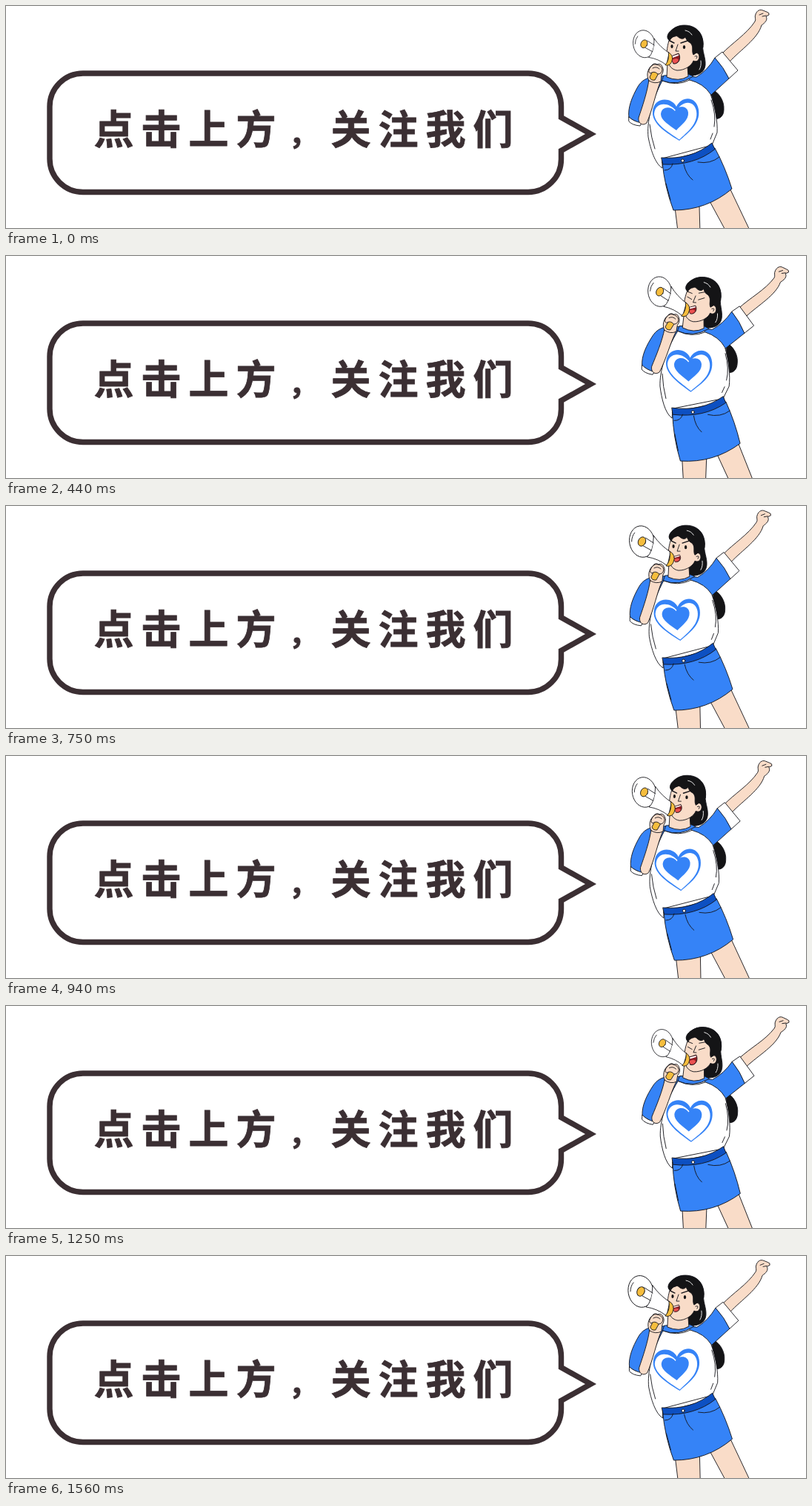
Write an HTML page that moves like this. It is 1080 by 300 pixels and loops after 1.62 s.

```html
<!DOCTYPE html>
<html lang="zh-CN">
<head>
<meta charset="utf-8">
<title>点击上方，关注我们</title>
<style>
  html, body { margin: 0; width: 100%; height: 100%; overflow: hidden; background: #fff; }
  svg { display: block; width: 1080px; height: 300px; }
  .bubble { fill: none; stroke: #3b2f33; stroke-width: 7.4; }
  .label { font: 900 54px "Noto Sans CJK SC", "Noto Sans CJK", sans-serif; letter-spacing: 10px; fill: #3b2f33; stroke: #3b2f33; stroke-width: .8; }
  .comma { font-size: 40px; letter-spacing: 17px; }
  #girl { stroke: #15151a; stroke-width: .9; stroke-linejoin: round; stroke-linecap: round; }
  .skin { fill: #f9dcc8; }
  .blue { fill: #3583f7; }
  .navy { fill: #0d50c2; }
  .white { fill: #fff; }
  .gold { fill: #f6bd3d; }
  .hair { fill: #141416; }
  .line { fill: none; }
  .bare { stroke: none; }
</style>
</head>
<body>
<svg viewBox="0 0 1080 300">
  <path class="bubble" d="M104 91H705A44.500 44.500 0 0 1 749.500 135.500V150.500L789.500 173L749.500 195.500V207A44.500 44.500 0 0 1 705 251.500H104A45 45 0 0 1 59 206.500V136A45 45 0 0 1 104 91Z"/>
  <text class="label" x="118.5" y="186.5">点击上方<tspan class="comma" dx="7">，</tspan>关注我们</text>

  <g id="girl">
    <!-- ponytail and back hair -->
    <path class="hair" d="M952 112C962 116 970 128 969 140C969 149 963 154 956 152Z"/>
    <path class="hair" d="M896 45C894 34 903 26 916 26C932 26 941 37 941 51C939 60 945 70 944 80C943 90 934 95 920 94L900 86Z"/>

    <!-- legs -->
    <path class="skin" d="M950 264L994 345H1024L977 246Z"/>
    <path class="skin" d="M903 272L912 345H938L936 270Z"/>

    <!-- raised arm -->
    <path class="skin" d="M966 65C980 50 1000 38 1011 21C1013 18 1010 15 1012 11C1014 6 1018 4 1022 6L1027 8Q1031 9 1030 12L1026 14C1029 19 1024 23 1020 26C1015 44 992 59 977 75Z"/>
    <path class="line" d="M1017 12L1022 10M1021 14L1026 13"/>
    <path class="white" d="M957 70L967 62L988 87L976 98Z"/>
    <path class="blue" d="M920 95L932 96Q947 87 957 70Q969 83 976 98L952 120L936 122Z"/>

    <!-- shirt -->
    <path class="blue" d="M890 95C868 94 859 99 853 109C845 123 839 138 841 151L857 160L880 116Z"/>
    <path class="white" d="M841 150Q847 156 858 158L856 162Q845 161 841 156Z"/>
    <path class="white" d="M886 101Q905 109 923 100Q942 105 951 119C957 135 961 157 960 171L953 188L886 206V219C876 213 870 193 867 177C865 158 871 129 886 101Z"/>
    <path class="blue" d="M888 94L921 92L928 95Q907 109 886 101Z"/>
    <path class="line" d="M952 127Q959 147 956 163M869 160Q871 178 876 193M954 172L951 180"/>
    <g class="bare blue">
      <path fill-rule="evenodd" d="M909 182C893 172 872 160 873 143C874 123 898 122 905 136C912 121 932 121 935 140C938 160 920 172 909 182ZM909 180.500C919 171 935 159 932 142C929 126 912 128 905 142C895 129 876 129 875 146C876 160 895 171 909 180.500Z"/>
      <path d="M905 168C896 161 884 155 884 146C885 135 898 135 903 142C907 134 920 134 921 144C922 154 911 161 905 168Z"/>
    </g>

    <!-- skirt -->
    <path class="blue" d="M886 211L957 192Q971 218 980 247Q946 276 901 276Q889 244 886 211Z"/>
    <path class="navy" d="M885 205Q925 208 953 185L957 193.500Q929 216 887 214Z"/>
    <circle class="white" cx="913.500" cy="209" r="2"/>
    <path class="line" d="M934 211Q951 214 963 204M889 222Q898 222 900 213M915 214Q918 228 927 235M891 240L897 262"/>

    <!-- head -->
    <path class="skin" d="M893 76L892 96Q908 103 921 95L920 82Z"/>
    <path class="skin" d="M896 43C893 53 891 62 893 71C894 81 899 86 906 87C917 87 926 80 928 74C936 78 939 65 932 63L928 65L929 50L916 36Z"/>
    <path class="hair" d="M896 47C889 42 895 34 902 30C912 24 930 26 937 37Q942 45 941 56L932 63L928 66C925 61 929 55 924 50Q919 48 917 42Q914 46 909 43Q905 39 903 41Q898 42 896 47Z"/>
    <path class="line" stroke="#fff" d="M917 33Q923 34 926 39M938 74Q939 81 936 86"/>
    <path class="line" d="M930 68Q935 66 932 71M907 52L904 61L908 61"/>
    <g id="open">
      <path class="line" stroke-width="1.4" d="M896 47L902 50M911 50L920 47"/>
      <ellipse class="hair bare" cx="899" cy="54.500" rx="1.600" ry="2.500"/>
      <ellipse class="hair bare" cx="915.500" cy="55.500" rx="1.700" ry="2.600"/>
    </g>
    <path id="shut" class="line" d="M896 47L902 49M911 48L919 46M896 54L902 57M911 57L919 54"/>
    <g id="mouth">
      <path fill="#8c1d22" d="M898 68Q903 66 908 64C912 71 908 79 901 78Q898 73 898 68Z"/>
      <path class="bare" fill="#ea5150" d="M899 73Q906 69 908 73Q906 78 901 77Z"/>
      <path class="bare white" d="M899 68L908 65L908 67L900 70Z"/>
    </g>

    <!-- forearm, megaphone and hand -->
    <path class="skin" d="M868 99C866 116 859 136 854 151C853 158 859 163 865 158C873 140 877 117 884 101Z"/>
    <g id="horn">
      <ellipse class="white" cx="856" cy="48" rx="17" ry="21.500" transform="rotate(-10 856 48)"/>
      <path class="line" d="M846 36Q842 41 842 48"/>
      <path class="white" d="M872 40Q881 53 895 62L891 81Q878 71 863 69Q871 63 872 40Z"/>
      <path class="white bare" d="M860 44L871 50L869 58L858 54Z"/>
      <path class="line" d="M861 43L872 50M858 54L869 60"/>
      <ellipse class="gold" cx="856" cy="48" rx="5" ry="6.500" transform="rotate(25 856 48)"/>
      <path class="gold" d="M894 61Q903 66 899 76Q896 83 889 81Q896 73 894 61Z"/>
    </g>
    <path class="skin" d="M868 101C864 94 866 86 871 81Q875 76 879 79Q884 77 886 82Q889 87 885 93L884 102Q876 106 868 101Z"/>
    <path class="gold" d="M874 86L869 96Q870 101 876 100L882 89Z"/>
    <path class="skin" d="M868 86Q872 78 877 79Q885 80 886 86Q885 92 880 92Q875 87 870 91Q867 90 868 86Z"/>
    <path class="line" d="M873 84Q878 81 882 85"/>
  </g>
</svg>
<script>
  const LOOP = 1620, STEP = 62.5;
  const KEYS = [0, 4, 7, 12, 17, 22, 25];
  // cumulative phases, in degrees, at each key step
  const SWAY = [0, 112, 200, 326, 456, 615, 697];
  const PULSE = [0, 248, 424, 634, 890, 1196, 1350];

  const [girl, horn, mouth, open, shut] =
    ['girl', 'horn', 'mouth', 'open', 'shut'].map(id => document.getElementById(id));

  function cosAt(phases, step) {
    let k = 0;
    while (k < KEYS.length - 2 && step > KEYS[k + 1]) k++;
    const p = (step - KEYS[k]) / (KEYS[k + 1] - KEYS[k]);
    return Math.cos((phases[k] + (phases[k + 1] - phases[k]) * p) * Math.PI / 180);
  }

  const scaleAt = (x, y, sx, sy) =>
    `translate(${x} ${y}) scale(${sx} ${sy}) translate(${-x} ${-y})`;

  function draw(now) {
    const step = Math.floor((now % LOOP + 2.5) / STEP);
    const lean = 0.52 * (1 - cosAt(SWAY, step));
    const pulse = cosAt(PULSE, step);
    const size = 1 - 0.135 * pulse;
    const gape = (1 + pulse) / 2;
    const blink = lean > 0.95;

    girl.setAttribute('transform', `rotate(${3.72 * lean} 890 420)`);
    horn.setAttribute('transform', scaleAt(896, 72, size, size));
    mouth.setAttribute('transform', scaleAt(904, 70, 0.65 + 0.35 * gape, 0.35 + 0.65 * gape));
    open.style.display = blink ? 'none' : '';
    shut.style.display = blink ? '' : 'none';
  }

  function tick() {
    draw(performance.now());
    requestAnimationFrame(tick);
  }
  tick();
</script>
</body>
</html>
```
